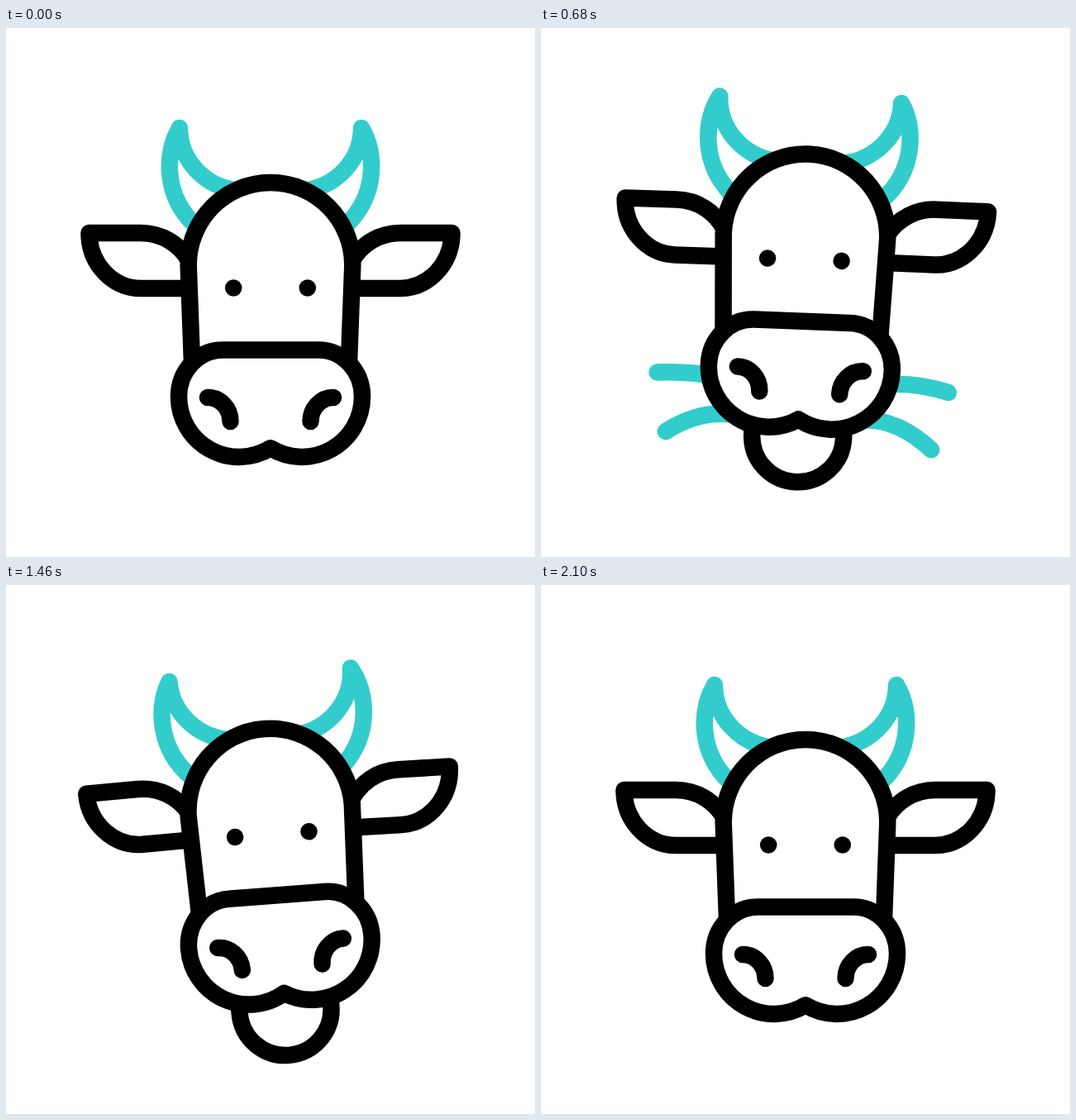
These frames come from a looping animation (640x640 px, 2.4 s). An HTML page:

```html
<!DOCTYPE html>
<html lang="en">
<head>
<meta charset="utf-8">
<title>Chewing cow</title>
<style>
  html, body { margin: 0; width: 100%; height: 100%; overflow: hidden; background: #fff; }
  svg { display: block; width: 100%; height: 100%; }
  path { fill: #fff; stroke: #000; stroke-width: 20.5; stroke-linecap: round; stroke-linejoin: round; }
  .line { fill: none; }
  .teal { fill: none; stroke: #33cccc; }
</style>
</head>
<body>
<svg viewBox="0 0 640 640">
  <defs>
    <path id="horn" class="teal" d="M275 196C240 190 210 160 210 121C192 152 191 202 228 238"/>
    <path id="ear" d="M222 282.5A67 67 0 0 0 163 248H100.5A63 67 0 0 0 163 315H222"/>
    <path id="nostril" class="line" d="M244 447A27.5 29 0 0 1 271.5 476"/>
  </defs>
  <g id="cow">
    <g id="grass" transform="translate(320 509)"></g>
    <g id="horns">
      <use href="#horn"/>
      <use href="#horn" transform="matrix(-1 0 0 1 640 0)"/>
    </g>
    <g id="earL"><use href="#ear"/></g>
    <g transform="matrix(-1 0 0 1 640 0)"><g id="earR"><use href="#ear"/></g></g>
    <path id="head"/>
    <path id="tongue" d="M264.5 500V509A55.5 55.5 0 0 0 375.5 509V500"/>
    <path d="M262 389.5H378A53 56.5 0 0 1 431 446A73 73 0 0 1 320 508.3A73 73 0 0 1 209 446A53 56.5 0 0 1 262 389.5Z"/>
    <g id="eyes">
      <circle cx="275.2" cy="314.5" r="10.3"/>
      <circle cx="364.8" cy="314.5" r="10.3"/>
    </g>
    <g id="nose">
      <use href="#nostril"/>
      <use href="#nostril" transform="matrix(-1 0 0 1 640 0)"/>
    </g>
  </g>
</svg>
<script>
const LOOP = 2400, STEP = 20, MOVE_END = 2100;
const $ = id => document.getElementById(id);
const smooth = u => (1 - Math.cos(Math.PI * u)) / 2;
const linear = u => u;

// Interpolates a table of [time, value] steps.
function at(keys, t, ease = smooth) {
  if (t <= keys[0][0]) return keys[0][1];
  for (let i = 1; i < keys.length; i++) {
    const [t0, a] = keys[i - 1], [t1, b] = keys[i];
    if (t <= t1) return a + (b - a) * ease((t - t0) / (t1 - t0));
  }
  return keys[keys.length - 1][1];
}

const lift = [[0, 0], [355, 71], [705, -36], [1060, 64], [1410, -17], [1800, 63], [2100, 0]];
const nod = [[0, 0], [355, 26.4], [705, 0], [1060, 26.4], [1410, 0], [1800, 26.4], [2100, 0]];
const tilt = [[0, 0], [420, -16.5], [870, 13.6], [1310, -7.6], [1733, 4.1], [2100, 0]];
const tuck = [[0, 90], [300, 0], [1850, 0], [2100, 90]];

// Each blade: root, height of its bend, growth span, and tip positions over time.
const tipTimes = [460, 680, 1040, 1240, 1400];
const blades = [
  { root: [-95, -48], bend: -54, grow: [330, 440], x: [-181, -173, -145, -100, -95], y: [-32, -51, -45, -48, -48] },
  { root: [95, -46], bend: -52, grow: [310, 420], x: [190, 180, 125, 98, 95], y: [-34, -40, -41, -46, -46] },
  { root: [-55, 2], bend: -16, grow: [457, 545], x: [-147, -160, -139, -130, -60], y: [31, 20, 27, 22, 0] },
  { root: [55, 2], bend: -16, grow: [430, 520], x: [158, 162, 136.5, 113, 60], y: [32, 30, 32, 10, 0] }
];
for (const b of blades) {
  b.el = document.createElementNS('http://www.w3.org/2000/svg', 'path');
  b.el.setAttribute('class', 'teal');
  b.el.setAttribute('pathLength', 1);
  $('grass').append(b.el);
  b.x = tipTimes.map((t, i) => [t, b.x[i]]);
  b.y = tipTimes.map((t, i) => [t, b.y[i]]);
}

function drawBlade(b, t) {
  const [start, end] = b.grow;
  const shown = Math.min(1, (t - start) / (end - start));
  const visible = shown > 0 && t < 1400;
  b.el.style.visibility = visible ? 'visible' : 'hidden';
  if (!visible) return;
  const x = at(b.x, t, linear), y = at(b.y, t, linear);
  const [rx, ry] = b.root;
  b.el.setAttribute('d', `M${x} ${y}Q${(x + rx) / 2} ${b.bend} ${rx} ${ry}`);
  b.el.setAttribute('stroke-dasharray', shown < 1 ? `${shown} 2` : 'none');
}

const move = (id, value) => $(id).setAttribute('transform', value);

function draw(t) {
  const d = at(nod, t);
  move('cow', `translate(${-0.2 * d} ${at(lift, t)}) rotate(${at(tilt, t)} 320 287)`);

  // Looking down: horns and eyes slide, the crown flattens, the ears droop.
  const slide = `translate(${-0.12 * d} ${d})`;
  move('horns', slide);
  move('eyes', slide);
  move('nose', `translate(${0.12 * d} ${0.55 * d})`);
  const droop = `rotate(${-0.89 * d} 214 302)`;
  move('earL', droop);
  move('earR', droop);

  const top = 187 + d / 2;
  const side = 287 - 55 * (287 - top) / 100;
  $('head').setAttribute('d',
    `M225 404L220.7 287C220.7 ${side} 265 ${top} 320 ${top}S419.3 ${side} 419.3 287L415 404`);

  move('tongue', `translate(0 ${20 - 0.94 * d - at(tuck, t)})`);
  blades.forEach(b => drawBlade(b, t));
}

const start = performance.now();
function tick() {
  const t = (performance.now() - start) % LOOP;
  draw(Math.min(MOVE_END, Math.floor(t / STEP) * STEP));
  requestAnimationFrame(tick);
}
tick();
</script>
</body>
</html>
```
